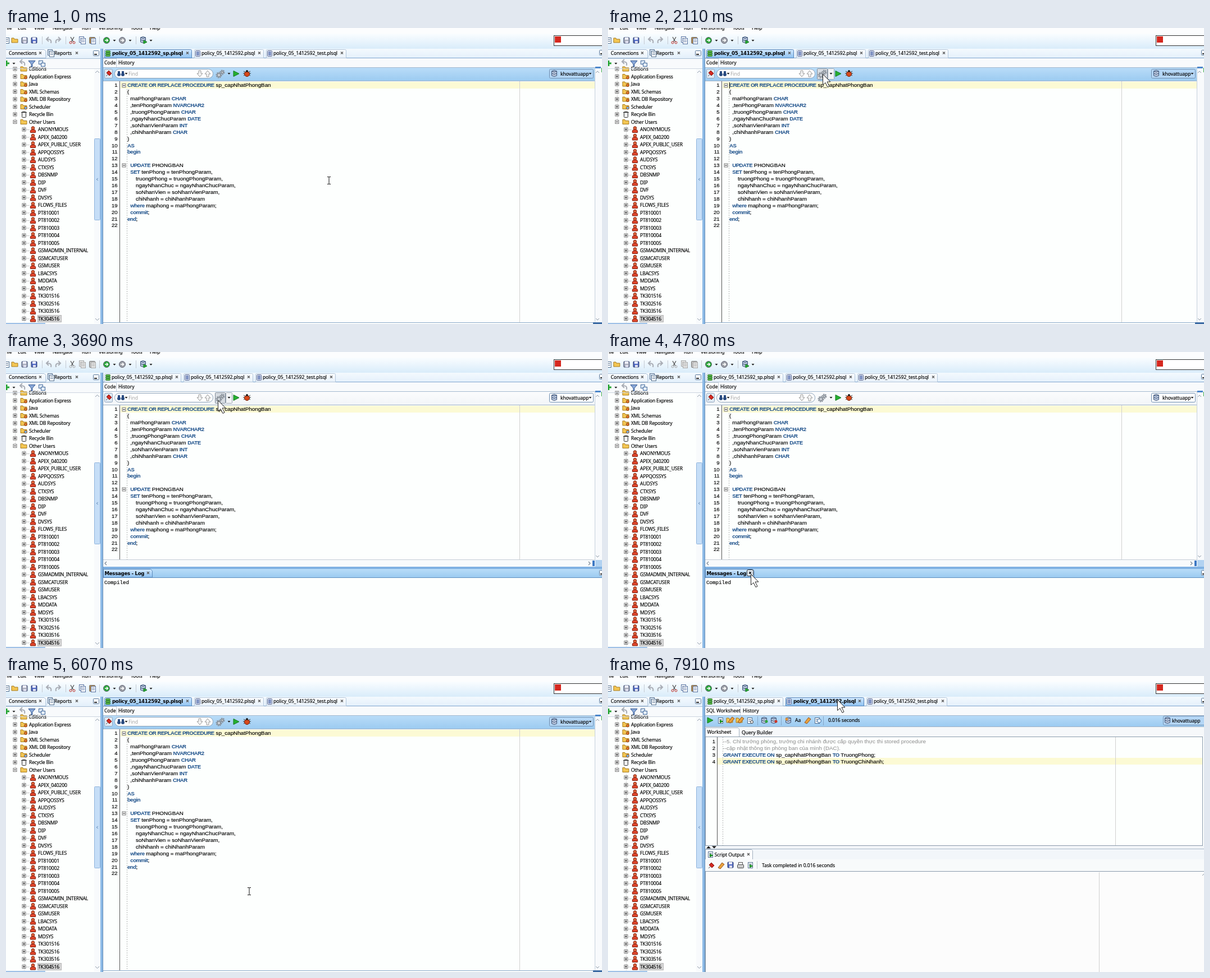
These frames come from a looping animation (1061 px wide and 528 px high, 8 s). An HTML page:

```html
<!DOCTYPE html>
<html lang="en">
<head>
<meta charset="utf-8">
<title>Stored procedure editor</title>
<style>
html, body { margin: 0; width: 100%; height: 100%; overflow: hidden; background: #fff; }
svg { display: block; width: 1061px; height: 528px; }
text { white-space: pre; fill: #000; stroke: #000; stroke-width: .15px; }
.u { font: 8.6px "Noto Sans", sans-serif; letter-spacing: -.2px; }
.t { font: 8.6px "Noto Sans", sans-serif; letter-spacing: -.06px; }
.b { font: bold 8.6px "DejaVu Sans", sans-serif; letter-spacing: -.28px; stroke: none; }
.c { font: 9.8px "Liberation Sans", Arial, sans-serif; }
.n { font: 9.5px "Liberation Sans", Arial, sans-serif; text-anchor: end; }
.k { font-weight: bold; font-size: 9.6px; letter-spacing: -.5px; fill: #1b4f8a; stroke: none; }
.r { fill: #8a8a8a; stroke: none; }
.m { font: 9.2px "Liberation Mono", monospace; }
.g { fill: #a4a4a4; stroke: none; }
</style>
</head>
<body>
<svg id="stage" viewBox="0 0 1061 528" xmlns="http://www.w3.org/2000/svg"></svg>
<script>
const LOOP = 8000;
const DB = "khovattuapp";
const PAPER = "#fdfffe";

// drawing helpers
const rect = (x, y, w, h, fill, more = "") => `<rect x="${x}" y="${y}" width="${w}" height="${h}" fill="${fill}" ${more}/>`;
const box = (x, y, w, h, fill, line, r = 0) => rect(x + .5, y + .5, w - 1, h - 1, fill, `stroke="${line}" rx="${r}"`);
const path = (d, fill = "none", line = "none", w = 1) => `<path d="${d}" fill="${fill}" stroke="${line}" stroke-width="${w}"/>`;
const dot = (x, y, r, fill, line = "none") => `<circle cx="${x}" cy="${y}" r="${r}" fill="${fill}" stroke="${line}"/>`;
const text = (x, y, s, cls = "u") => `<text x="${x}" y="${y + 3}" class="${cls}">${s}</text>`;
const group = (id, ...parts) => `<g id="${id}">${parts.join("")}</g>`;
const vline = (x, y1, y2, line, dash = "") => `<path d="M${x + .5} ${y1}V${y2}" stroke="${line}" stroke-dasharray="${dash}"/>`;
const hline = (x1, x2, y, line) => `<path d="M${x1} ${y + .5}H${x2}" stroke="${line}"/>`;
const code = (x, y, s) => text(x, y, s.split("*").map((p, i) => i % 2 ? `<tspan class="k">${p}</tspan>` : p).join(""), "c");
const gradient = (id, a, b) => `<linearGradient id="${id}" x2="0" y2="1"><stop stop-color="${a}"/><stop offset="1" stop-color="${b}"/></linearGradient>`;

// icons, placed by their centre
const cross = (x, y, line = "#555") => path(`M${x - 2} ${y - 2}l4 4m0 -4l-4 4`, "none", line, 1.2);
const down = (x, y, fill = "#222") => path(`M${x - 2.5} ${y - 1}h5l-2.5 3z`, fill);
const play = (x, y, s = 5) => path(`M${x - s} ${y - s}L${x + s} ${y}L${x - s} ${y + s}z`, "#25b030", "#13781c");
const plus = (x, y, open) => box(x - 3.5, y - 3.5, 7, 7, "#fff", "#777") + hline(x - 2, x + 2, y - .5, "#222") + (open ? "" : vline(x - .5, y - 2, y + 2, "#222"));
const folder = (x, y) => path(`M${x - 6} ${y + 4}v-8h4l1 2h6v6z`, "#f3c653", "#a87a1d");
const disk = (x, y, c = "#4c66c0") => box(x - 5.5, y - 5.5, 11, 11, c, "#39456e", 1) + rect(x - 3, y - 5, 6, 4, "#eef") + rect(x - 2, y + 1, 5, 4, "#dde");
const sheet = (x, y, c = "#fff", line = "#55708f") => box(x - 4, y - 5, 9, 11, c, line) + hline(x - 2, x + 3, y - 2, line) + hline(x - 2, x + 3, y + 1, line);
const cylinder = (x, y) => path(`M${x - 4.5} ${y - 4}v8q4.500 3 9 0v-8q-4.500 -3 -9 0q4.500 3 9 0`, "#b9c6dc", "#3f567a") + path(`M${x - 4.500} ${y}q4.500 3 9 0`, "none", "#3f567a");
const stack = (x, y) => [-4, -.5, 3].map(d => box(x - 4, y + d - 1, 9, 4, "#5cb848", "#29742a", 1)).join("");
const sqlDoc = (x, y) => box(x - 4, y - 5, 9, 11, "#e6ebf6", "#51618e", 1) + rect(x - 2, y - 3, 5, 7, "#7f92c2");
const person = (x, y) => path(`M${x - 4.500} ${y + 5.500}q-1.500 -5.500 4.500 -5.500t4.500 5.500z`, "#e0452b", "#7c1d0e") + dot(x, y - 2.5, 2.8, "#e2653a", "#7c1d0e");
const ring = (x, y, c) => dot(x, y, 5.5, c, "#667") + path(`M${x - 3} ${y}h5m-2 -2.500l2.500 2.500l-2.500 2.500`, "none", "#fff", 1.5);
const bend = (x, y, s) => path(`M${x + 4 * s} ${y + 5}q${2 * s} -8 ${-8 * s} -7m${4 * s} -4l${-4 * s} 4l${4 * s} 4`, "none", "#a9adb5", 2);
const scissors = (x, y, c) => path(`M${x - 3} ${y - 6}l5 9m1 -9l-5 9`, "none", "#555", 1.3) + dot(x - 3, y + 4, 2, "none", c) + dot(x + 3, y + 4, 2, "none", c);
const gear = (x, y, r) => `<circle cx="${x}" cy="${y}" r="${r}" fill="none" stroke="#8b939c" stroke-width="3" stroke-dasharray="2 1"/>` + dot(x, y, r - 1, "#c9ced4", "#777f88");
const bug = (x, y) => path(`M${x - 6} ${y - 4}l12 8m0 -8l-12 8m-1 -4h14`, "none", "#333") + dot(x, y + 1, 4.5, "#d8491c", "#701d08") + dot(x, y - 4, 2, "#222");
const pin = (x, y) => path(`M${x - 5} ${y + 5}l4 -4`, "none", "#555") + path(`M${x - 4} ${y - 1}l4 -4l5 5l-4 4z`, "#d22a22", "#801510");
const pencil = (x, y) => path(`M${x - 5} ${y + 4}l7 -9l4 3l-7 8z`, "#e9a23c", "#96511c");
const minimize = (x, y) => box(x, y, 11, 10, "#f8fbff", "#5b7899", 1) + rect(x + 2, y + 6, 5, 2, "#333");
const tab = (x, icon, label, tx, cx, active) =>
  path(`M${x - 5.5} 53.500v-13q0 -2 2 -2h${cx - x + 9}q2 0 2 2v13z`, active ? "url(#on)" : "url(#off)", active ? "#5585ba" : "#b3c6da") +
  icon(x, 45) + text(tx, 45, label, active ? "b" : "t") + cross(cx, 44.5);

const FILES = ["policy_05_1412592_sp.plsql", "policy_05_1412592.plsql", "policy_05_1412592_test.plsql"];
const tabs = (places, active) => places.map(([x, tx, cx], i) => tab(x, i ? sqlDoc : stack, FILES[i], tx, cx, i === active)).join("");

const defs = "<defs>" + gradient("on", "#d3e9ff", "#8cc0f0") + gradient("off", "#fbfdff", "#e8f1fa") +
  gradient("bar", "#b9dcf8", "#9ccbf1") + gradient("pale", "#fbfcfd", "#f2f5f8") + gradient("top", "#fafdff", "#d9ecfa") + gradient("strip", "#f4f9fe", "#e3f0fb") + "</defs>";

function mainBar() {
  const menu = [[-3, "File"], [21, "Edit"], [50, "View"], [83, "Navigate"], [135, "Run"], [165, "Versioning"], [222, "Tools"], [256, "Help"]];
  const clip = (cut, fill, line, board) => scissors(118, 22, cut) + sheet(134, 20, fill, line) + sheet(137, 23, fill, line) +
    box(148, 16, 11, 12, board, "#777", 1) + sheet(155, 23, fill, line);
  return rect(0, 0, 1061, 10, "#fcfdfe") + rect(0, 10, 1061, 27, "url(#top)") + menu.map(([x, s]) => text(x, 0, s, "t")).join("") +
    sheet(1, 22) + folder(16, 22) + disk(33, 22, "#a6abb8") + disk(50, 22) +
    vline(64, 15, 29, "#c4cad2") + bend(76, 22, 1) + bend(93, 22, -1) + vline(106, 15, 29, "#c4cad2") +
    group("clipOn", clip("#bd3028", "#fff", "#55709f", "#b78a4a")) + group("clipOff", clip("#a8a8a8", "#e4e4e4", "#a8a8a8", "#c2c2c2")) +
    vline(166, 15, 29, "#c4cad2") + ring(179, 22, "#28a638") + down(193, 22) + ring(207, 22, "#9a9fa6") + down(221, 22) +
    vline(231, 15, 29, "#c4cad2") + cylinder(244, 21) + play(248, 25, 3) + down(258, 22) +
    box(975, 13, 90, 19, "#fff", "#333") + rect(977, 15, 11, 11, "#d5281f");
}

function sidebar() {
  let s = rect(0, 37, 168, 491, PAPER) + rect(0, 37, 168, 17, "url(#strip)") +
    path("M-2 53.500v-15h70l3 3v12z", "url(#off)", "#9fb8d3") + text(5, 45, "Connections", "t") + cross(61, 44.5) +
    sheet(78, 43, "#dce8f5") + sheet(81, 46) + text(86, 45, "Reports", "t") + cross(126, 44.5) + minimize(155, 40) +
    rect(0, 54, 168, 18, "#f8fafc") + path("M-4 63h10M1 58v10", "none", "#26a534", 3) + down(14, 63) +
    bend(29, 62, 1) + path("M40 58.500h12l-5 6v5h-2v-5z", "#8aa8d8", "#345891") + box(58, 58, 8, 7, "#e2edfb", "#3f6596") + box(62, 62, 8, 7, "#e2edfb", "#3f6596");
  s += vline(16, 73, 168, "#c6c6c6", "1 1") + vline(32, 174, 526, "#c6c6c6", "1 1");
  ["Editions", "Application Express", "Java", "XML Schemas", "XML DB Repository", "Scheduler", "Recycle Bin", "Other Users"].forEach((name, i) => {
    const y = 73 + 13.5 * i;
    s += plus(16, y, i === 7) + (i === 6 ? box(28, y - 5, 8, 11, "#eee", "#333", 1) + hline(27, 37, y - 4, "#333") : folder(32, y)) +
      (i && i < 6 ? dot(35, y + 2, 2.5, i === 5 ? "#7db8e8" : "#e0762c", "#8d4719") : "") + text(41, y, name);
  });
  const users = "ANONYMOUS APEX_040200 APEX_PUBLIC_USER APPQOSSYS AUDSYS CTXSYS DBSNMP DIP DVF DVSYS FLOWS_FILES".split(" ");
  for (let i = 1; i < 6; i++) users.push("PT81000" + i);
  users.push(..."GSMADMIN_INTERNAL GSMCATUSER GSMUSER LBACSYS MDDATA MDSYS".split(" "));
  for (let i = 1; i < 5; i++) users.push("TK30" + i + "516");
  s += box(56, 512, 43, 13, "#d6d6d6", "#b5b5b5");
  users.forEach((name, i) => {
    const y = 181 + 13.5 * i;
    s += hline(36, 42, y, "#c6c6c6") + plus(32, y) + person(48, y) + text(57, y, name);
  });
  return s + rect(0, 54, 168, 1, "#a9bfd6") + rect(0, 55, 168, 17, "#f8fafc", 'opacity="0"') + hline(0, 168, 72, "#ccd5df") +
    rect(157, 73, 11, 454, "#f8fafc") +
    path("M159 80l3.500 -3.500l3.500 3.500", "none", "#8b98a6") + path("M159 518l3.500 3.500l3.500 -3.500", "none", "#8b98a6") +
    box(157, 197, 11, 146, "#c6def7", "#8fb4dc", 1) + path("M164 268l-3 2l3 2", "none", "#6d94be") +
    rect(0, 526, 70, 2, "#9dc0e6") + rect(168, 37, 5, 491, "#8dbae6") + vline(172, 37, 528, "#5d88b4");
}

const SOURCE = ["0*CREATE OR REPLACE PROCEDURE* sp_capNhatPhongBan", "0(", "1maPhongParam *CHAR*", "1,tenPhongParam *NVARCHAR2*",
  "1,truongPhongParam *CHAR*", "1,ngayNhanChucParam *DATE*", "1,soNhanVienParam *INT*", "1,chiNhanhParam *CHAR*", "0)", "0*AS*", "0*begin*", "0",
  "1*UPDATE* PHONGBAN", "1*SET* tenPhong = tenPhongParam,", "2truongPhong = truongPhongParam,", "2ngayNhanChuc = ngayNhanChucParam,",
  "2soNhanVien = soNhanVienParam,", "2chiNhanh = chiNhanhParam", "1*where* maphong = maPhongParam;", "1*commit*;", "0*end*;", "0"];

const dbBox = (x, y, fill) => box(x, y, 79, 17, fill, "#7291b3", 2) + cylinder(x + 9, y + 8) + text(x + 20, y + 8.5, DB, "t") + down(x + 73, y + 8);

function editor() {
  let s = rect(173, 37, 888, 491, PAPER) + rect(173, 37, 888, 17, "url(#strip)") + hline(173, 1061, 53, "#7fa5ce") +
    group("focused", tabs([[181, 189, 323], [341, 348, 451], [469, 476, 598]], 0), rect(173, 71, 876, 23, "url(#bar)"), dbBox(967, 73, "#b4d6f5")) +
    group("blurred", tabs([[181, 188, 304], [322, 329, 432], [450, 457, 579]], -1), rect(173, 71, 876, 23, "url(#pale)"), dbBox(967, 73, "#fcfdfe")) +
    group("tabHover", rect(337, 39, 119, 14, "#fff"), sqlDoc(341, 45), text(348, 45, FILES[1], "t"), cross(451, 44.5, "#000")) +
    rect(173, 54, 876, 17, "#f8fafc") + box(172, 54, 25, 17, "#fff", "#c3cdd8") + text(175, 62, "Code", "t") + text(200, 62, "History", "t") +
    hline(173, 1049, 70, "#a3b9cf") + hline(173, 1049, 94, "#9fb2c6") +
    box(175, 73, 15, 17, "#dfe9f4", "#8fa5bd", 2) + pin(183, 81) + box(193, 73, 176, 17, "#fff", "#8ba1b8", 8) +
    dot(201, 83, 3, "#294b80") + dot(208, 83, 3, "#294b80") + rect(199, 77, 4, 5, "#294b80") + rect(206, 77, 4, 5, "#294b80") +
    down(214, 81) + text(218, 82, "Find", "t g") +
    path("M343 76h4v5h3l-5 6l-5 -6h3zM357 87h4v-5h3l-5 -6l-5 6h3z", "#f5f5f5", "#999") +
    group("press", box(372, 72, 19, 20, "#d7dce2", "#7f8b99", 1), box(391, 72, 12, 20, "#f2f4f6", "#9aa5b1", 1)) +
    gear(379, 84, 4) + gear(385, 79, 3) + down(397, 81) + play(410, 81.5) + bug(429, 81) +
    rect(204, 96, 845, 12, "#fcfad4");
  SOURCE.forEach((line, i) => {
    const y = 102 + 11.905 * i;
    s += `<text x="198.5" y="${y + 3.4}" class="n">${i + 1}</text>` + code([216, 221.3, 231][line[0]], y + .4, line.slice(1));
  });
  return s + vline(202, 95, 525, "#555") + vline(215, 109, 525, "#b5b5b5", "2 2") + vline(914, 95, 525, "#d0d0d0") +
    plus(210, 102.5, true) + plus(210, 245, true) +
    rect(1049, 54, 12, 473, "#f8fafc") + vline(1048, 71, 526, "#c4d0dc") + rect(1049, 69, 10, 3, "#4b86cb") + rect(1060, 71, 1, 8, "#3bab47") +
    path("M1050 80l3 -3l3 3M1050 518l3 3l3 -3", "none", "#8b98a6") + hline(173, 1061, 525, "#88a6c7") + rect(1045, 525, 16, 3, "#3c6ba4") + minimize(1056, 39) +
    group("caret", vline(216, 97, 108, "#000"));
}

const logPanel = () => group("log", rect(173, 371, 888, 157, PAPER), rect(1049, 358, 11, 12, "#f8fafc"), path("M1050 363l3 3l3 -3", "none", "#8b98a6"),
  rect(173, 371, 872, 12, "#f8fafc"), hline(173, 1049, 370, "#c3ccd6"),
  group("scroll", path("M179 374l-3 3l3 3M1037 374l3 3l-3 3", "none", "#7c8794", 1.3)), rect(1049, 371, 12, 12, "#b2d2f1"), rect(1044, 372, 4, 10, "#3d78c4"),
  rect(173, 383, 888, 4, "#7fb0e2"), rect(173, 387, 888, 15, "url(#bar)"), path("M173.500 402v-14.500h84l3 3v11.500z", "url(#on)", "#5f8dbf"),
  text(175.5, 394.5, "Messages - Log", "b"), cross(253, 394), hline(173, 1061, 402, "#5f8dbf"), minimize(1056, 389),
  group("closeHover", box(247, 388, 12, 12, "#e8f1fb", "#222", 2), cross(253, 394, "#000")),
  group("compiled", text(175, 410.5, "Compiled", "m")));

function worksheet() {
  let s = rect(173, 37, 888, 491, PAPER) + rect(173, 37, 888, 17, "url(#strip)") + hline(173, 1061, 53, "#7fa5ce") +
    tabs([[181, 188, 304], [322, 330, 448], [466, 473, 596]], 1) + minimize(1056, 39) +
    rect(173, 54, 888, 16, "#f8fafc") + box(172, 54, 64, 17, "#fff", "#c3cdd8") + text(175, 62, "SQL Worksheet", "t") + text(240, 62, "History", "t") +
    rect(173, 70, 888, 20, "url(#bar)") + hline(173, 1061, 70, "#a3b9cf") + hline(173, 1061, 90, "#9fb2c6") +
    play(182, 79) + sheet(200, 79) + play(202, 81, 2.5) + folder(217, 79) + pencil(219, 78) + folder(234, 79) + pencil(236, 78) + sheet(252, 79) + dot(256, 82, 2.5, "#eee", "#444") +
    vline(266, 72, 88, "#86a5c6") + cylinder(278, 79) + dot(282, 81, 2.5, "#31a63c") + cylinder(295, 79) + dot(299, 81, 2.5, "#ce3527") + vline(308, 72, 88, "#86a5c6") +
    cylinder(321, 79) + dot(318, 77, 2.5, "#e1933a") + text(333, 79, "Aa", "t") + pencil(355, 79) + sheet(372, 79) + dot(376, 80, 3.5, "#e9f2fc", "#34669d") +
    vline(383, 72, 88, "#86a5c6") + text(392, 79, "0.016 seconds", "t") + box(988, 71, 76, 17, "#b4d6f5", "#7291b3", 2) + cylinder(996, 79) + text(1004, 79.5, DB, "t") +
    rect(173, 91, 888, 17, "#f6f8fa") + path("M173.500 108v-15.500h58l2 2v13.500", "#fff", "#a2b0bf") + text(176.5, 100, "Worksheet", "t") + text(238, 100.5, "Query Builder", "t") +
    box(173, 108, 886, 195, PAPER, "#8a9aab") + rect(195, 146, 863, 12, "#fcfad4");
  ["--5. Chỉ trưởng phòng, trưởng chi nhánh được cấp quyền thực thi stored procedure", "--cập nhật thông tin phòng ban của mình (DAC).",
    "*GRANT EXECUTE ON* sp_capNhatPhongBan *TO* TruongPhong;", "*GRANT EXECUTE ON* sp_capNhatPhongBan *TO* TruongChiNhanh;"].forEach((line, i) => {
    const y = 117 + 11.8 * i;
    s += `<text x="191" y="${y + 3.4}" class="n">${i + 1}</text>` + (i < 2 ? text(204.5, y + .4, line, "c r") : code(205, y + .4, line));
  });
  return group("worksheet", s, vline(194, 109, 302, "#555"), vline(204, 109, 302, "#b5b5b5", "2 2"), vline(903, 109, 302, "#d0d0d0"),
    group("caret2", vline(492, 146, 157, "#000")),
    rect(173, 303, 888, 6, "#f2f5f8"), path("M175 307.500l4 -4l4 4zM185 303.500h8l-4 4z", "#111"), rect(173, 309, 888, 18, "#f2f6fa"), hline(173, 1061, 308, "#a8b8c9"),
    path("M173.500 327v-17.500h82l2 2v15.500", "#fbfcfe", "#a2b0bf"), sheet(182, 318), play(184, 320, 2.5), text(189.5, 318.5, "Script Output", "t"), cross(250, 318),
    rect(173, 327, 888, 21, "#f8fafb"), pin(184, 338), pencil(201, 338), disk(218, 337), box(230, 336, 12, 7, "#ccc", "#444", 1), box(232, 332, 8, 5, "#fff", "#555"),
    sheet(253, 337), play(255, 339, 2.5), vline(265, 330, 344, "#c4cad2"), text(274, 337.5, "Task completed in 0.016 seconds", "t"),
    box(173, 348, 892, 184, "#fcfcfc", "#8a9aab"), vline(874, 350, 528, "#d0d0d0"), path("M1058 356l3 -3l3 3", "none", "#8b98a6"));
}

document.getElementById("stage").innerHTML = defs + mainBar() + editor() + logPanel() + worksheet() + sidebar() +
  group("arrow", path("M.5 .5v19l4.500 -4l4 8l3 -1.500l-4 -8h6z", "#fff", "#222")) +
  group("beam", path("M-3 -6.500h2.500l.5 .5l.5 -.5h2.500M0 -6v12M-3 6.500h2.500l.5 -.5l.5 .5h2.500", "none", "#111"));

// pointer legs: start, end, steps, from, bend, to
const LEGS = [
  [280, 1290, 8, [575, 272], [510, 12], [386, 79]],
  [1420, 1800, 4, [386, 79], [384, 81], [382, 82]],
  [3690, 3690, 1, [382, 82], [380, 84], [377, 86]],
  [3810, 4650, 7, [377, 86], [325, 240], [253, 395]],
  [4780, 4780, 1, [253, 395], [253, 395], [254, 396]],
  [5790, 6070, 3, [254, 396], [350, 395], [433, 384]],
  [6200, 6750, 5, [433, 384], [510, 250], [440, 78]],
  [6900, 7350, 4, [440, 78], [425, 56], [408, 42]]
];

function pointer(t) {
  const [t0, t1, n, a, b, c] = LEGS.filter(l => l[0] <= t).pop() || LEGS[0];
  const gap = n > 1 ? (t1 - t0) / (n - 1) : 1;
  const k = t < t0 ? 0 : Math.min(n, Math.floor((t - t0) / gap + 1.001)) / n;
  return [0, 1].map(i => (1 - k) * (1 - k) * a[i] + 2 * k * (1 - k) * b[i] + k * k * c[i]);
}

const within = (t, a, b) => t >= a && t < b;
const show = (id, on) => { document.getElementById(id).style.display = on ? "" : "none"; };

function draw(t) {
  const [x, y] = pointer(t);
  const blurred = within(t, 2390, 5460);
  const log = within(t, 2545, 5300);
  const sheetOn = t >= 7630;
  const beam = !sheetOn && y > 95 && !(log && y > 370);
  show("focused", !blurred);
  show("blurred", blurred);
  show("clipOn", !blurred);
  show("clipOff", blurred);
  show("log", log);
  show("compiled", t >= 2700);
  show("scroll", t >= 3690);
  show("closeHover", t >= 4650);
  show("press", x > 371 && x < 403 && y > 71 && y < 92);
  show("tabHover", y < 53);
  show("caret", within(t, 2110, 2390) || within(t, 6340, 6900) || within(t, 7350, 7630));
  show("worksheet", sheetOn);
  show("caret2", within(t, 7630, 7910));
  show("arrow", !beam);
  show("beam", beam);
  document.getElementById(beam ? "beam" : "arrow").setAttribute("transform", `translate(${Math.round(x)} ${Math.round(y)})`);
}

const start = performance.now();
function tick() {
  draw((performance.now() - start) % LOOP);
  requestAnimationFrame(tick);
}
tick();
</script>
</body>
</html>
```
